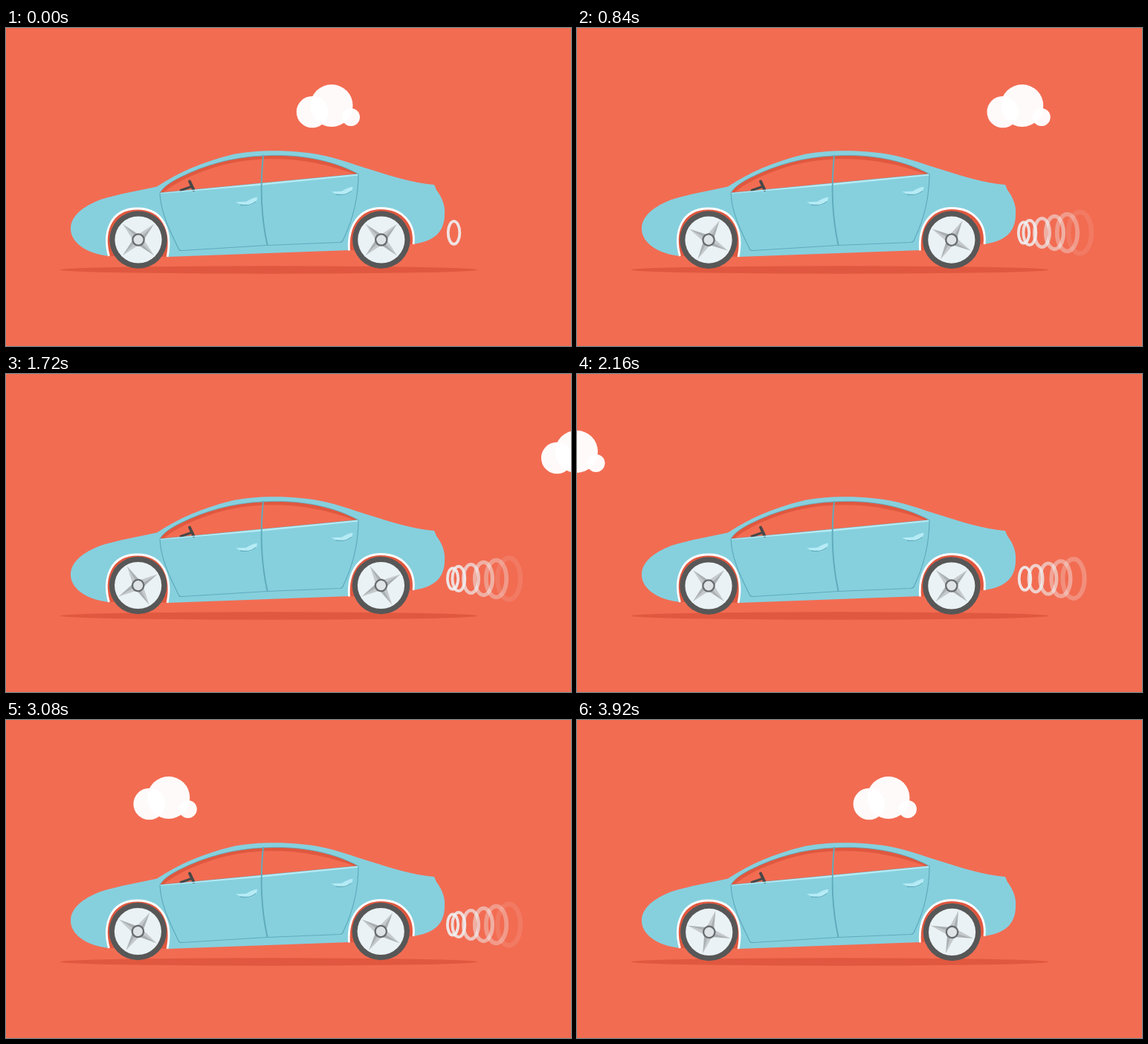
Recreate the animation shown at these times as an HTML page with a canvas. Size 760 px wide and 428 px high, loop 3.96 s.

```html
<!DOCTYPE html>
<html lang="en">
<head>
<meta charset="utf-8">
<title>Driving car</title>
<style>
html, body { margin: 0; width: 100%; height: 100%; overflow: hidden; background: #f26c52; }
canvas { display: block; }
</style>
</head>
<body>
<canvas id="stage" width="760" height="428"></canvas>
<script>
const ctx = document.getElementById('stage').getContext('2d');
const STEP = 40, STEPS = 99, HALF = 1980;
const RED = '#f26c52', DARK_RED = '#e0583f', BLUE = '#86d0de', LINE = '#5fabbc', PALE = '#b5ebf5';

const fill = (shape, color) => { ctx.fillStyle = color; ctx.fill(new Path2D(shape)); };
const stroke = (shape, color, width) => {
  ctx.strokeStyle = color;
  ctx.lineWidth = width;
  ctx.stroke(new Path2D(shape));
};
const oval = (x, y, rx, ry, color) => {
  ctx.fillStyle = color;
  ctx.beginPath();
  ctx.ellipse(x, y, rx, ry, 0, 0, Math.PI * 2);
  ctx.fill();
};
const disc = (x, y, r, color) => oval(x, y, r, r, color);

const BODY = 'M87 269C88 252 104 240 127 231C151 223.5 178 219 203 213.5C232 194 266 180 302 171' +
  'C326 165 367 164 396 167C434 170 462 182 492 191C520 200 546 208 576 211L579 218' +
  'C587 229 591 239 590 251C590 273 577 288 546 291L462 299L217 308L139 307C108 304 86 288 87 269Z';
const WINDOW = 'M207 222C211 214 222 207 234 201C268 184 304 174 345 172C392 169 438 177 474 196.5Z';
const GLASS = 'M212 221.5C224 211 242 201.5 262 194C290 183 317 178 345 176.5C390 174.5 430 182 470 197Z';
const FRONT_ARCH = 'M138.5 307C130 277 139 243 177 243C212 243 224 274 217 308';
const REAR_ARCH = 'M461.5 299.5C459 264 477 242.5 504 242.5C535 242.5 551 265 548 291';
const HANDLE = 'M0 6L14 5.5Q23 0 29 -0.5Q29 7 21 10Q12 12 6 9Z';

function drawCloud(x) {
  const white = 'rgba(255,255,255,0.97)';
  disc(x - 26, 113, 21.3, white);
  disc(x, 104.5, 28.5, white);
  disc(x + 26, 120, 12, white);
}

function drawHandle(x, y) {
  ctx.save();
  ctx.translate(x, y);
  fill(HANDLE, PALE);
  stroke('M6 9.5Q20 12 27 5', LINE, 1.2);
  ctx.restore();
}

function drawBody() {
  oval(353.5, 325.5, 281, 5.2, DARK_RED);
  fill(BODY, BLUE);
  fill(WINDOW, DARK_RED);
  fill(GLASS, RED);
  stroke(WINDOW, LINE, 0.8);

  ctx.lineCap = 'round';
  stroke('M247 206.5L252.5 218', '#484848', 4);
  stroke('M235 218.5L248 214', '#484848', 3);
  ctx.lineCap = 'butt';

  fill('M207 222L474 196.5V198.5L345 211.5L207 223Z', PALE);
  stroke('M207 222C208 249 221 274 232 297Q233 300 237 299.5L351 292.5L449 288.5' +
    'Q453 288 454 284C467 257 474 227 474 196', LINE, 1.2);
  stroke('M346 171C342 210 342 249 351.5 292', LINE, 1.9);
  drawHandle(309, 228.3);
  drawHandle(437.5, 214.3);

  for (const arch of [FRONT_ARCH, REAR_ARCH]) {
    fill(arch, DARK_RED);
    stroke(arch, '#fff', 2.8);
  }
}

function drawWheel(x, y, angle) {
  ctx.save();
  ctx.translate(x + 0.5 * Math.cos(angle), y - 0.5 * Math.sin(angle));
  disc(0, 0, 38.8, '#575757');
  disc(0, 0, 31.6, '#eaf2f5');
  ctx.rotate(Math.PI / 4 - angle);
  for (let i = 0; i < 4; i++) {
    fill('M0 0L0 -30L-5.2 -5.2Z', '#c5c9cb');
    fill('M0 0L0 -30L5.2 -5.2Z', '#abb0b2');
    ctx.rotate(Math.PI / 2);
  }
  disc(0, 0, 8.8, '#686c6e');
  disc(0, 0, 6.5, '#dfe4e6');
  ctx.restore();
}

// Each puff starts gently, then drifts back, widens and fades.
function drawRing(age) {
  if (age < -40 || age > 360) return;
  const drift = a => a * a / (a + 14);
  const growth = age > 0 ? drift(age) / drift(320) : 0;
  const small = age < 0 ? 0.92 : 1;
  const opacity = age > 320 ? 0.1 : 0.9 - 0.64 * growth;
  ctx.strokeStyle = `rgba(238,241,243,${opacity})`;
  ctx.lineWidth = 3.8 + 2.2 * growth;
  ctx.beginPath();
  ctx.ellipse(602.5 + 65.5 * growth - (age < 0 ? 1.5 : 0), 275.5,
    (7.8 + 6.8 * growth) * small, (15.4 + 11 * growth) * small, 0, 0, Math.PI * 2);
  ctx.stroke();
}

function drawSmoke(t) {
  if (t > 0) drawRing(t - 120);
  drawRing(t);
  drawRing(t - 240);
  for (let start = 320; start <= 3120; start += 80) drawRing(t - start);
}

function draw(t) {
  const late = t >= HALF;
  const cloudX = late ? -0.5 + (t - 2160) * 0.2383 : 438 + t * 0.1914;
  const degrees = late ? 180 + (t - 2160) / STEP * 43.6 : t / STEP * 43.6;
  const angle = degrees * Math.PI / 180;

  ctx.fillStyle = RED;
  ctx.fillRect(0, 0, 760, 428);
  drawCloud(cloudX);
  drawBody();
  drawWheel(177.5, 285, angle);
  drawWheel(504.3, 285, angle);
  drawSmoke(t);
}

function tick() {
  draw(Math.floor(performance.now() / STEP) % STEPS * STEP);
  requestAnimationFrame(tick);
}
tick();
</script>
</body>
</html>
```
